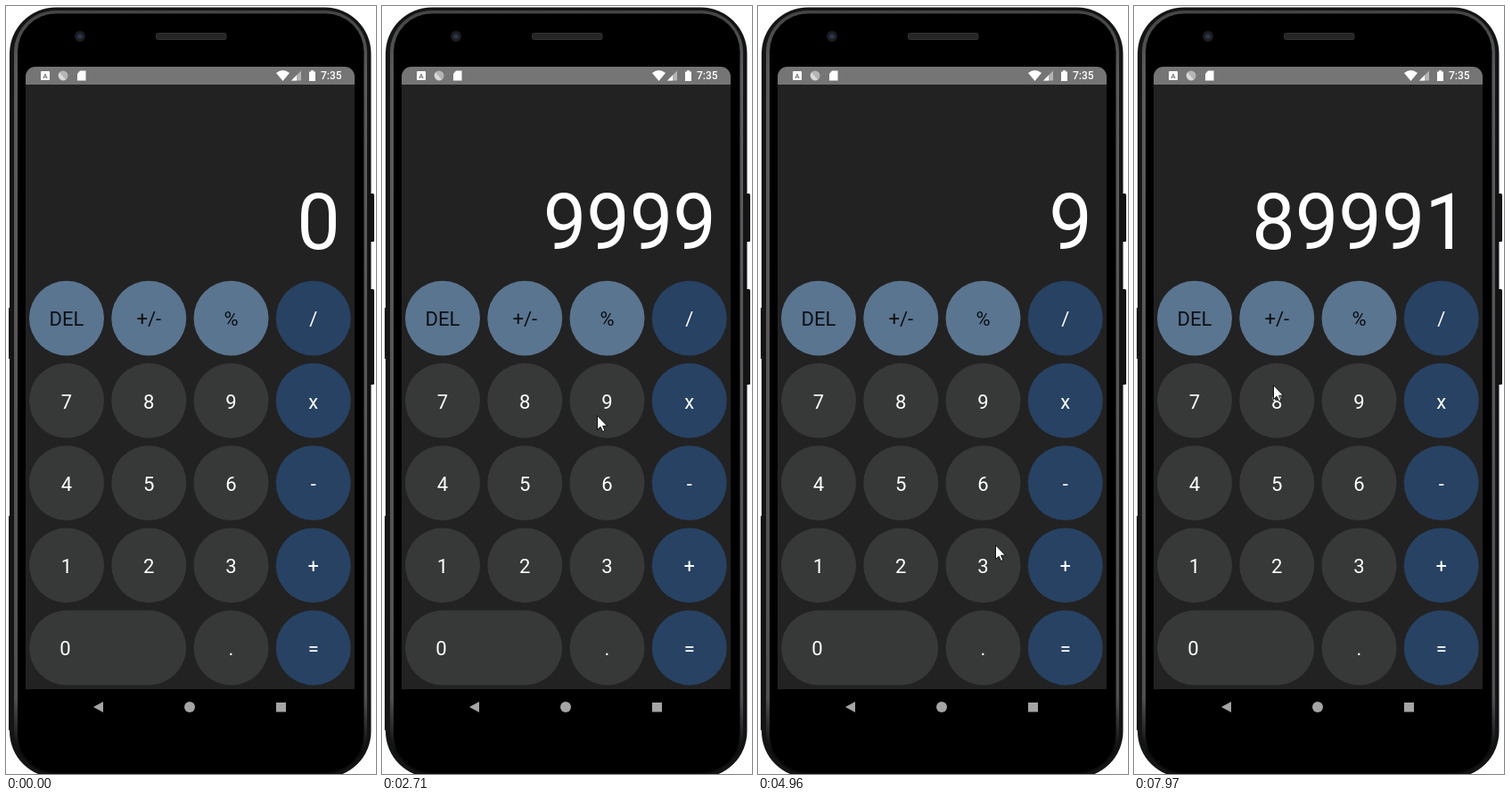
An HTML page that plays this animation: 415x860 px, repeating every 8 s.

```html
<!DOCTYPE html>
<html lang="en">
<head>
<meta charset="utf-8">
<title>Calculator</title>
<style>
html, body { margin: 0; width: 100%; height: 100%; overflow: hidden; background: #fff; }
svg { display: block; width: 100vw; height: 100vh; font-family: Roboto, sans-serif; }
#keys text { font-size: 22px; text-anchor: middle; }
</style>
</head>
<body>
<svg viewBox="0 0 415 860">
  <defs>
    <linearGradient id="bevel" x2="0" y2="1">
      <stop offset="0" stop-color="#444"/>
      <stop offset=".08" stop-color="#5a5a5a"/>
      <stop offset=".9" stop-color="#505050"/>
      <stop offset=".97" stop-color="#0c0c0c"/>
    </linearGradient>
  </defs>

  <!-- phone -->
  <g fill="#131415">
    <rect x="407" y="210" width="6" height="54" rx="1.5"/>
    <rect x="407" y="317" width="6" height="107" rx="1.5"/>
    <rect x="3" y="338" width="4" height="57"/>
    <rect x="3" y="571" width="4" height="240"/>
    <rect x="4" y="1.5" width="405.5" height="862.5" rx="52"/>
  </g>
  <rect x="9" y="5" width="396" height="855" rx="47" fill="url(#bevel)"/>
  <rect x="13" y="8.5" width="388.500" height="850" rx="43"/>
  <circle cx="83" cy="34" r="6" fill="#1b1d20"/>
  <circle cx="83" cy="34" r="2.6" fill="#2b3850"/>
  <rect x="168.5" y="30.5" width="78.5" height="7" rx="2" fill="#252525" stroke="#353535"/>

  <!-- screen -->
  <rect x="22" y="88" width="369" height="677" fill="#222"/>
  <path d="M22 88V79A11 11 0 0 1 33 68H380A11 11 0 0 1 391 79V88Z" fill="#757575"/>
  <g fill="#fff">
    <rect x="39" y="73" width="10" height="10" rx="1"/>
    <text x="44" y="81" font-size="8" font-weight="700" text-anchor="middle" fill="#757575">A</text>
    <circle cx="64" cy="78" r="5.5" fill="#b5b5b5"/>
    <path d="M60 74.5A5.5 5.5 0 0 0 67 82.5Z" fill="#d8d8d8"/>
    <path d="M80 76L83 72.5H89.5V83.5H80Z"/>
    <path d="M303 75Q310.5 69 318 75L310.5 84Z"/>
    <path d="M331 72.5V83.5H320Z" opacity=".45"/>
    <path d="M326 77.5V83.5H320Z"/>
    <path d="M340 73.5H342V72H345V73.5H347V84H340Z"/>
    <text x="353" y="82.3" font-size="12" font-weight="500">7:35</text>
    <text id="display" x="374.9" y="272.1" font-size="86.4" text-anchor="end">0</text>
  </g>
  <g id="keys"></g>
  <g fill="#a5a5a5">
    <path d="M98 785L109 779V791Z"/>
    <circle cx="206" cy="785" r="6"/>
    <rect x="303" y="780" width="11" height="10.5"/>
  </g>

  <!-- pointer -->
  <g id="pointer">
    <circle id="spot" r="12" fill="#faeb00" opacity=".6"/>
    <path d="M.5.8V16.5L4.1 13.2L6.6 18.6L9 17.5L6.6 12.2H11.6Z" fill="#fff" stroke="#000" stroke-width=".9"/>
  </g>
</svg>
<script>
const LOOP = 8000, START = 447, STEP = 77.5;
const $ = id => document.getElementById(id);
const clamp = v => Math.max(0, Math.min(1, v));
const smooth = p => p * p * (3 - 2 * p);

// Keypad
const rows = ["DEL +/- % /", "7 8 9 x", "4 5 6 -", "1 2 3 +", "0 _ . ="];
const pitch = 92.25;
$("keys").innerHTML = rows.map((row, r) => row.split(" ").map((label, c) => {
  if (label === "_") return "";
  const x = 26 + c * pitch, y = 307.8 + r * pitch;
  const wide = label === "0";
  const fill = c === 3 ? "#274263" : r === 0 ? "#5a7590" : "#373938";
  const ink = r === 0 && c < 3 ? "#0c0f12" : "#fff";
  return `<g data-key="${label}">
    <rect x="${x}" y="${y}" width="${wide ? 176 : 84}" height="83.6" rx="41.8" fill="${fill}"/>
    <text x="${x + (wide ? 40.5 : 42)}" y="${y + 50.5}" fill="${ink}">${label}</text></g>`;
}).join("")).join("");

// Times are in steps. The phone answers a press late, at "reply".
const entry = { x: 312, y: 817 };
const moves = [
  { from: 0, to: 10, x: 257, y: 452 },
  { from: 24, to: 28, x: 231, y: 459 },
  { from: 28, to: 33, x: 331, y: 447 },
  { from: 38, to: 47, x: 265, y: 444 },
  { from: 53, to: 61, x: 267, y: 676 },
  { from: 61, to: 68, x: 315, y: 725 },
  { from: 90, to: 97, x: 156, y: 424 }
];
const presses = [
  { key: "9", on: 11, off: 12, reply: 14, show: ["9"] },
  { key: "9", on: 17, off: 22, reply: 23, show: ["99", "999", "9999"] },
  { key: "x", on: 36, off: 37, reply: 38, show: ["0"] },
  { key: "9", on: 49, off: 51, reply: 53, show: ["9"] },
  { key: "=", on: 71, off: 74, reply: 77, show: ["89991"] }
];
for (const key of ["9", "x", "="]) {
  const node = document.querySelector(`[data-key="${key}"]`);
  presses.filter(p => p.key === key).forEach(p => p.node = node);
}

function pointerAt(k) {
  let { x, y } = entry;
  for (const m of moves) {
    const p = smooth(clamp((k - m.from) / (m.to - m.from)));
    x += (m.x - x) * p;
    y += (m.y - y) * p;
  }
  return [Math.round(x), Math.round(y)];
}

// A burst of clicks alternates evenly between down and up.
function isDown({ on, off, show }, k) {
  const beat = (off - on) / (2 * show.length - 1);
  return k >= on && k < off && Math.floor((k - on) / beat) % 2 === 0;
}

// Longer presses fade the key further; it recovers over a few steps.
function dimming({ on, off, reply }, k) {
  const length = off - on;
  if (k < reply - length) return 0;
  return 0.8 * clamp((length / 3) ** 2) * clamp((reply + 5 - k) / 4);
}

function draw(now) {
  const k = Math.floor((now % LOOP - START) / STEP);
  let text = "0";
  presses.forEach(p => p.node.setAttribute("opacity", 1));
  for (const p of presses) {
    const dim = dimming(p, k);
    if (dim) p.node.setAttribute("opacity", 1 - dim);
    p.show.forEach((s, i) => {
      if (k > p.reply - p.show.length + i) text = s;
    });
  }
  $("display").textContent = text;
  $("pointer").setAttribute("transform", `translate(${pointerAt(k)})`);
  $("pointer").style.display = k < 0 ? "none" : "";
  $("spot").style.display = presses.some(p => isDown(p, k)) ? "" : "none";
}

const begin = performance.now();
function tick() {
  draw(performance.now() - begin);
  requestAnimationFrame(tick);
}
tick();
</script>
</body>
</html>
```
